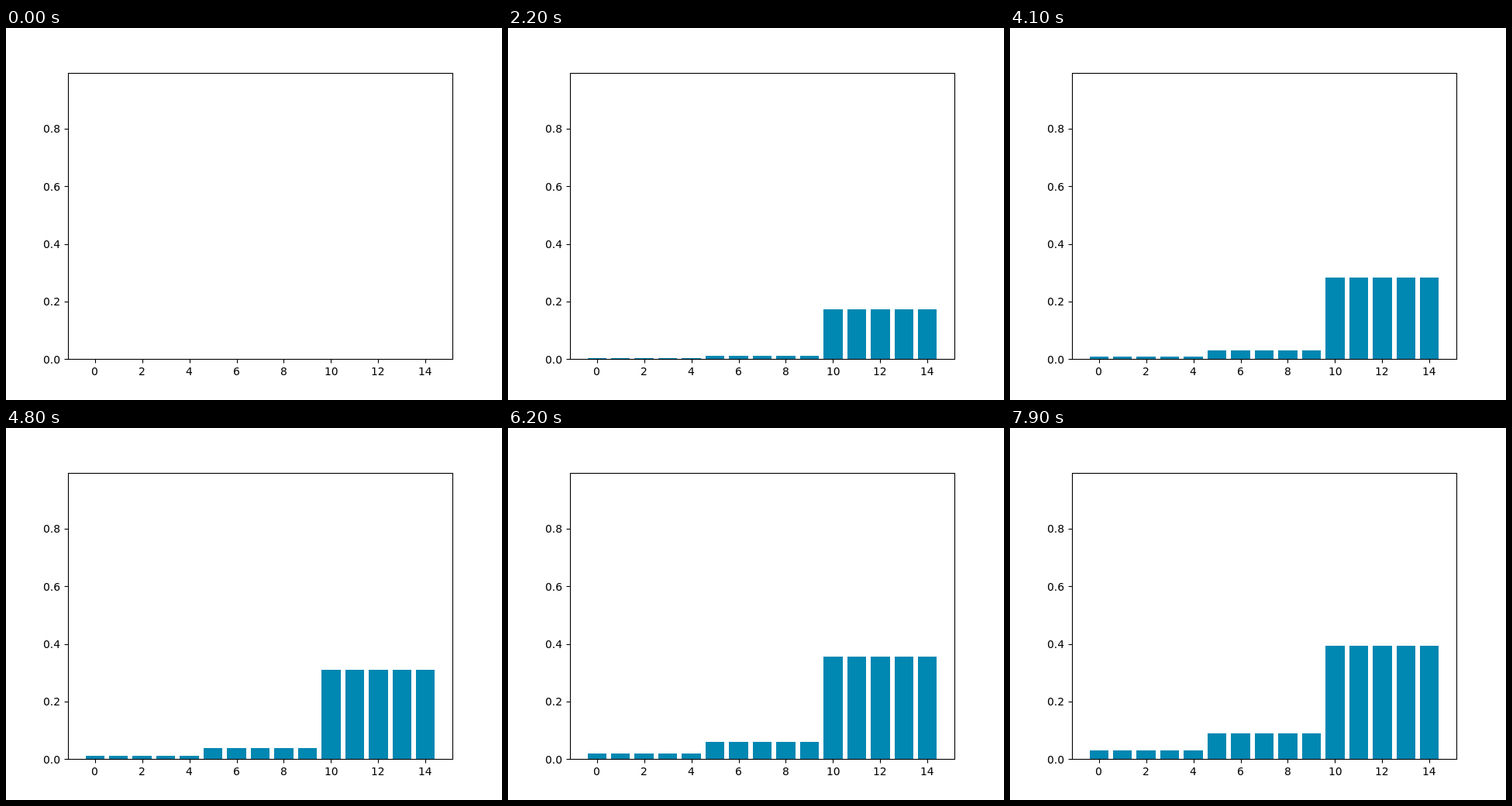
Animation, 640 px wide and 480 px high, one loop 8000 ms. Source, as an HTML page with a canvas:

```html
<!DOCTYPE html>
<html lang="en">
<head>
<meta charset="utf-8">
<title>Bar chart</title>
<style>
  html, body { margin: 0; width: 100%; height: 100%; overflow: hidden; background: #fff; }
  canvas { display: block; width: 640px; height: 480px; }
</style>
</head>
<body>
<canvas id="chart" width="640" height="480"></canvas>
<script>
const ctx = document.getElementById('chart').getContext('2d');

const LOOP = 8, STEP = 0.1;   // seconds
const LEFT = 80, RIGHT = 576, TOP = 58, BASE = 427;
const UNIT = 496 / 16.28;     // pixels per bar slot
const ROW = 74.3;             // pixels per 0.2 on the y axis
const DIGIT = 8.875;          // advance of one digit
const BAR_COLOR = '#0087b2';

const barX = v => LEFT + (v + 1.14) * UNIT;

// Accelerating growth that begins at `from` and reaches `end` pixels at 7.9 s
const grow = (t, from, end, power) =>
  Math.ceil(end * (Math.max(0, t - from) / (7.9 - from)) ** power);

// Quick first rise, then a slow approach to the limit
const settle = t =>
  Math.round(Math.max(Math.min(15, 35 * t), 173 * (1 - Math.exp((0.3 - t) / 4.1))));

// Height in pixels of each group of five bars
const groups = [
  t => grow(t, 0.7, 11, 1.8),
  t => grow(t, 0.3, 33, 1.7),
  settle
];

function line(x0, y0, x1, y1) {
  ctx.beginPath();
  ctx.moveTo(x0 + 0.5, y0 + 0.5);
  ctx.lineTo(x1 + 0.5, y1 + 0.5);
  ctx.stroke();
}

function drawBars(t) {
  ctx.fillStyle = BAR_COLOR;
  for (let i = 0; i < 15; i++) {
    const h = groups[Math.floor(i / 5)](t);
    const x = Math.round(barX(i - 0.4));
    ctx.fillRect(x, BASE - h, Math.round(barX(i + 0.4)) - x, h);
  }
}

function drawAxes() {
  ctx.strokeStyle = ctx.fillStyle = '#000';
  ctx.lineWidth = 1.111;
  ctx.font = '13.889px "DejaVu Sans", sans-serif';

  for (let v = 0; v <= 14; v += 2) {
    const x = Math.round(barX(v)), label = String(v);
    line(x, BASE, x, BASE + 5);
    ctx.fillText(label, Math.round(barX(v) - label.length * DIGIT / 2), 448);
  }
  for (let i = 0; i < 5; i++) {
    const y = 427.2 - i * ROW, tick = Math.round(y);
    line(LEFT - 5, tick, LEFT, tick);
    ctx.fillText((i * 0.2).toFixed(1), 48, Math.round(y + 5.35));
  }
  ctx.strokeRect(LEFT + 0.5, TOP + 0.5, RIGHT - LEFT, BASE - TOP);
}

const start = performance.now();

function render(now) {
  const elapsed = Math.max(0, now - start) / 1000 % LOOP;
  ctx.fillStyle = '#fff';
  ctx.fillRect(0, 0, 640, 480);
  drawBars(Math.floor(elapsed / STEP) * STEP);
  drawAxes();
  requestAnimationFrame(render);
}
render(start);
</script>
</body>
</html>
```
